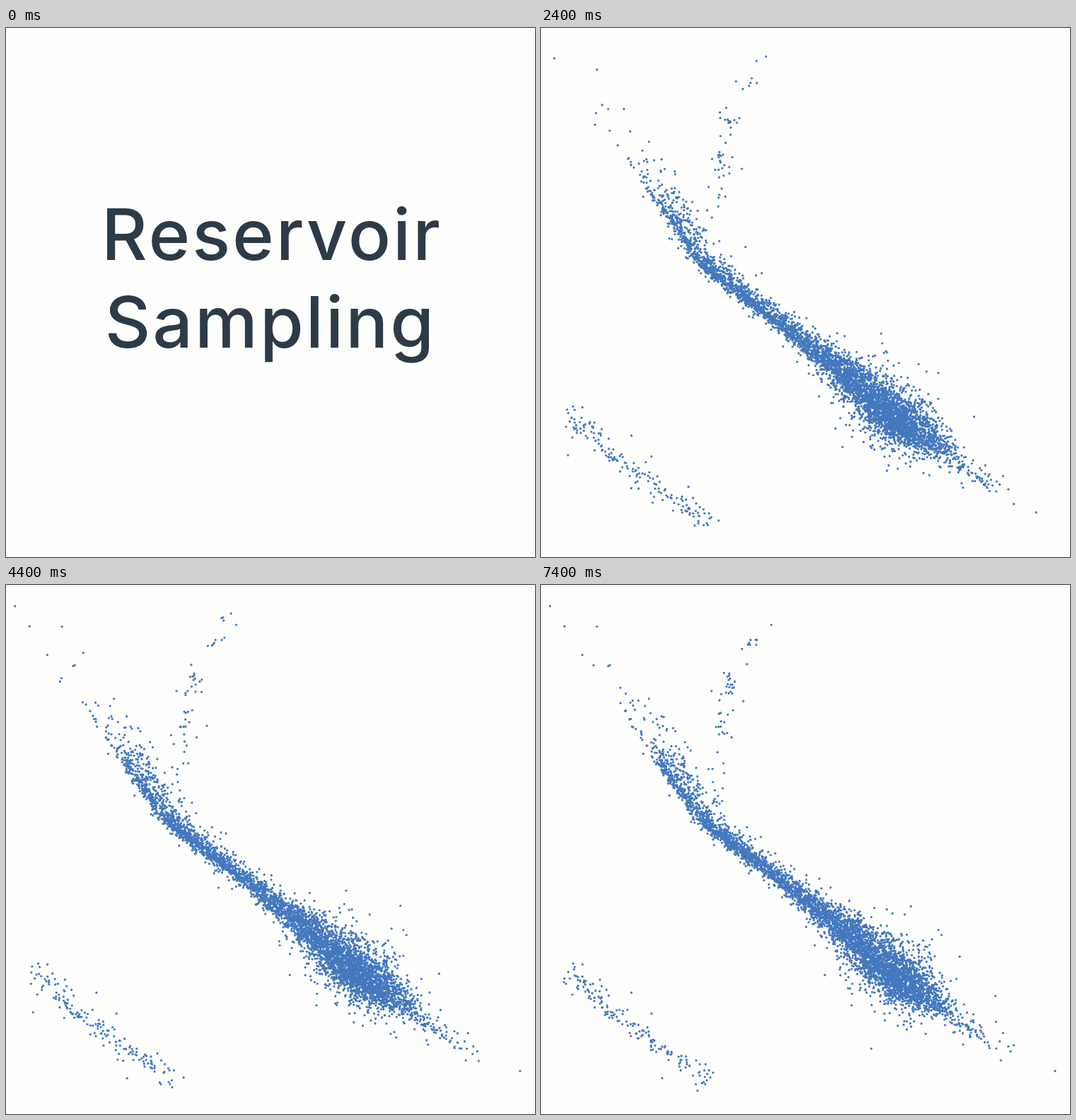
These frames come from a looping animation (748 by 748 pixels, 7.9 s). An HTML page with a canvas:

```html
<!DOCTYPE html>
<html lang="en">
<head>
<meta charset="utf-8">
<title>Reservoir Sampling</title>
<style>
  html, body { margin: 0; width: 100%; height: 100%; overflow: hidden; background: #fefefc; }
  svg, canvas { position: absolute; left: 0; top: 0; width: 748px; height: 748px; }
  text { font: 500 100px Inter, "Open Sans", sans-serif; letter-spacing: 0.03em; text-anchor: middle; fill: #2d3b48; }
</style>
</head>
<body>
<canvas id="plot" width="748" height="748"></canvas>
<svg id="title" viewBox="0 0 748 748">
  <text x="376" y="328">Reservoir</text>
  <text x="374" y="452">Sampling</text>
</svg>
<script>
const LOOP = 7900, TITLE = 900, STEP = 500, LAST = 13, SIZE = 748, RADIUS = 1.65;

function seeded(seed) {
  let a = Math.imul(seed + 1, 0x9E3779B1);
  return () => {
    a = (a + 0x6D2B79F5) | 0;
    let t = Math.imul(a ^ (a >>> 15), 1 | a);
    t = (t + Math.imul(t ^ (t >>> 7), 61 | t)) ^ t;
    return ((t ^ (t >>> 14)) >>> 0) / 4294967296;
  };
}

const bell = rnd => Math.sqrt(-2 * Math.log(1 - rnd())) * Math.cos(2 * Math.PI * rnd());
const decay = rnd => -Math.log(1 - rnd());
const hump = (x, mid, width) => Math.exp(-(((x - mid) / width) ** 2));
const above = (x, limit) => Math.max(0, x - limit);

// Bell curve in which a share of the draws is stretched into outliers
const heavyBell = (rnd, share, stretch) => bell(rnd) * (rnd() < share ? stretch : 1);

// Centre line of the main band: straight, steeper on the left, flatter at the right end
const mainLine = x => 388 + 0.78 * (x - 300) + 9 * hump(x, 500, 45)
  - 1.1 * above(225, x) ** 0.9 - 0.0022 * above(x, 590) ** 2;

function mainDot(x, rnd) {
  const slope = mainLine(x + 1) - mainLine(x);
  const down = 4.5 + 10.5 * hump(x, 495, 85);
  const up = down + 3 + 0.1 * above(260, x);
  const z = heavyBell(rnd, 0.09, 2.2);
  const off = z * (z > 0 ? up : down) / Math.hypot(1, slope);
  return [x + slope * off, mainLine(x) - off];
}

function lowerDot(rnd) {
  const d = 200 * rnd() ** 1.2;
  const spread = () => heavyBell(rnd, 0.08, 3) * 7;
  return [42 + d + spread(), 547 + d * (1 - 0.0012 * d) + spread()];
}

function branchDot(rnd) {
  const t = rnd() < 0.15 ? 1 + 0.6 * rnd() : rnd() ** 0.7;
  return [245 + 22 * t + 60 * above(t, 1) + 9 * bell(rnd), 262 - 135 * t + 9 * bell(rnd)];
}

const groups = [
  { count: 3000, dot: rnd => mainDot(488 + 44 * bell(rnd), rnd) },
  { count: 1950, dot: rnd => mainDot(172 + 268 * rnd() + 7 * bell(rnd), rnd) },
  { count: 75, dot: rnd => mainDot(172 - 33 * decay(rnd), rnd) },
  { count: 32, dot: rnd => mainDot(595 + 36 * decay(rnd), rnd) },
  { count: 165, dot: lowerDot },
  { count: 50, dot: branchDot }
];

// Every slot keeps its dot until a later batch replaces it, with chance 1 / (batches seen)
function makeSlot(dot, id) {
  const rnd = seeded(id + 500000);
  const life = [];
  for (let s = 0; s <= LAST; s++)
    if (rnd() < 1 / (s + 1)) life.push({ since: s, dot: dot(seeded(id * 16 + s)) });
  return life;
}

const slots = groups
  .flatMap(({ count, dot }) => Array(count).fill(dot))
  .map(makeSlot);

const ctx = document.getElementById("plot").getContext("2d");
const title = document.getElementById("title");

function draw(step) {
  title.style.visibility = step < 0 ? "visible" : "hidden";
  ctx.clearRect(0, 0, SIZE, SIZE);
  if (step < 0) return;
  ctx.fillStyle = "#4478be";
  ctx.beginPath();
  for (const life of slots) {
    const [x, y] = life.findLast(d => d.since <= step).dot;
    ctx.moveTo(x + RADIUS, y);
    ctx.arc(x, y, RADIUS, 0, 2 * Math.PI);
  }
  ctx.fill();
}

const begin = performance.now();
let shown = null;
function tick() {
  const t = (performance.now() - begin) % LOOP;
  const step = t < TITLE ? -1 : Math.min(LAST, Math.floor((t - TITLE) / STEP));
  if (step !== shown) draw(shown = step);
  requestAnimationFrame(tick);
}
tick();
</script>
</body>
</html>
```
